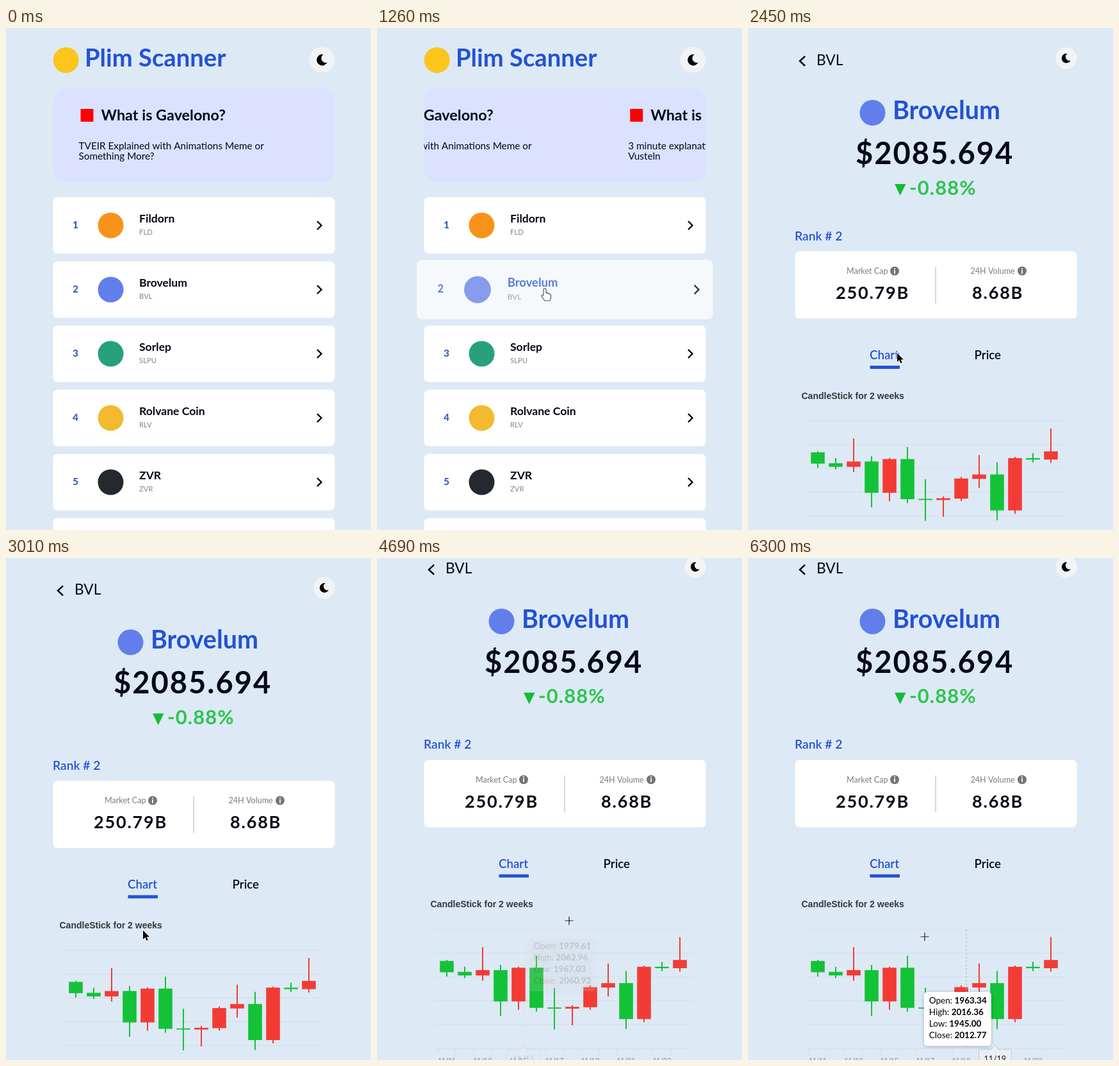
An HTML page with a canvas that plays this animation: 570 px wide and 782 px high, repeating every 6.37 s.

```html
<!DOCTYPE html>
<html lang="en">
<head>
<meta charset="utf-8">
<title>Plim Scanner</title>
<style>
html, body { margin: 0; width: 100%; height: 100%; overflow: hidden; background: #dde9f5; }
canvas { display: block; }
</style>
</head>
<body>
<canvas id="stage" width="570" height="782"></canvas>
<script>
const ctx = document.getElementById('stage').getContext('2d');
const LOOP = 6370, STEP = 70, BLUE = '#2352d4', INK = '#060818', BG = '#dde9f5';
const GREEN = '#14c237', RED = '#f33b36', SCROLL_END = 33.3;

const coins = [
  ['Fildorn', 'FLD', '#f7931a'], ['Brovelum', 'BVL', '#627eea'], ['Sorlep', 'SLPU', '#26a17b'],
  ['Rolvane Coin', 'RLV', '#f3ba2f'], ['ZVR', 'ZVR', '#23292f'], ['', '', '#fff']
];
const slides = [
  ['What is Gavelono?', 'TVEIR Explained with Animations Meme or', 'Something More?'],
  ['What is Brovelum?', '3 minute explanation with Tamelik', 'Vusteln']
];
// Each day opens where the day before closed.
const closes = [628, 645, 650, 642.3, 690.5, 638.5, 700.5, 701.7, 699.5, 668.8, 662.5, 718, 637, 638.7, 626.5];
const hints = [
  { at: 3500, day: 3, top: 595, values: '2054.16 2065.00 1933.00 1979.44' },
  { at: 4410, day: 4, top: 591, values: '1979.61 2062.96 1967.03 2060.92' },
  { at: 5180, day: 11, top: 676, values: '1936.10 2087.40 1933.80 2062.30' },
  { at: 6230, day: 8, top: 676, values: '1963.34 2016.36 1945.00 2012.77' }
];
const cursorPath = [
  [1470, 262, 407], [1680, 259, 405], [3010, 214, 580], [3500, 222, 490], [3640, 192, 663], [4340, 192, 663],
  [4690, 300, 565], [5040, 417, 560], [5320, 417, 690], [6090, 417, 690], [6300, 276, 590]
];

const HAND = new Path2D('M-1.6 0Q0-2 1.6 0V6Q3.8 5 4.6 7Q6.6 6 7 8Q9.3 7.5 9.3 10V13L7.5 17.5H0L-4.6 11Q-5 8.5-2.6 9.5L-1.6 10.5Z');
const ARROW = new Path2D('M0 0V14L3.3 11 5.5 16 7.8 15 5.6 10.2H10Z');
const PLUS = new Path2D('M-6.5 0H6.5M0-6.5V6.5');
const MOON = new Path2D('M2-8.3A8.7 8.7 0 1 0 8 4.2A7 7 0 0 1 2-8.3Z');

const clamp = v => Math.max(0, Math.min(1, v));
const mix = (a, b, p) => a + (b - a) * p;
const smooth = p => .5 - .5 * Math.cos(Math.PI * clamp(p));

function cursorAt(t) {
  const next = cursorPath.findIndex(k => k[0] > t);
  if (next < 1) return cursorPath.at(next).slice(1);
  const [t0, x0, y0] = cursorPath[next - 1], [t1, x1, y1] = cursorPath[next];
  const p = (t - t0) / (t1 - t0);
  return [mix(x0, x1, p), mix(y0, y1, p)];
}

function text(str, x, y, size, { color = INK, weight = 400, spacing = 0, align = 'left', font = 'Lato' } = {}) {
  ctx.font = `${weight} ${size}px ${font}, sans-serif`;
  ctx.letterSpacing = spacing + 'px';
  ctx.textAlign = align;
  ctx.fillStyle = color;
  ctx.fillText(str, x, y);
}
function box(x, y, w, h, r, color) {
  ctx.fillStyle = color;
  ctx.beginPath();
  ctx.roundRect(x, y, w, h, r);
  ctx.fill();
}
function disc(x, y, r, color) {
  box(x - r, y - r, 2 * r, 2 * r, r, color);
}
function line(points, color, width = 1) {
  ctx.beginPath();
  points.forEach(p => ctx.lineTo(...p));
  ctx.strokeStyle = color;
  ctx.lineWidth = width;
  ctx.stroke();
}
function placed(x, y, scale, draw) {
  ctx.save();
  ctx.translate(x, y);
  ctx.scale(scale, scale);
  draw();
  ctx.restore();
}
function themeButton(x, y, scale) {
  placed(x, y, scale, () => {
    disc(0, 0, 20, '#f2f3f4');
    ctx.fillStyle = '#000';
    ctx.fill(MOON);
  });
}

function carousel(shift) {
  ctx.save();
  ctx.beginPath();
  ctx.roundRect(73.5, 94, 440, 146, 20);
  ctx.fillStyle = '#dae2ff';
  ctx.fill();
  ctx.clip();
  slides.forEach(([title, first, second], i) => {
    const x = 113.5 + 440 * i - shift;
    box(x + 3, 126, 20, 20, 0, '#f00');
    text(title, x + 35, 144, 23.4, { weight: 700 });
    text(first, x, 189, 15.3);
    text(second, x, 205, 15.3);
  });
  ctx.restore();
}

function coinRow([name, ticker, color], i, hover) {
  ctx.globalAlpha = 1 - .25 * hover;
  placed(293.5, 307.5 + 100 * i, 1 + .05 * hover, () => {
    box(-220, -44, 440, 88, 7, '#fff');
    text(i + 1, -185, 4.5, 15.5, { color: '#2450c4', weight: 700, align: 'center' });
    disc(-130, 0, 20, color);
    text(name, -85.5, -4.5, 17.6, { color: hover ? BLUE : INK, weight: 700 });
    text(ticker, -85.5, 14.5, 11.3, { color: '#87878c' });
    line([[192.5, -6.5], [199, 0], [192.5, 6.5]], '#000', 2.4);
  });
  ctx.globalAlpha = 1;
}

function home(t) {
  disc(93.7, 50, 20, '#fbc51d');
  text('Plim Scanner', 123, 60, 38.2, { color: BLUE, weight: 700 });
  themeButton(493.5, 49.5, 1);
  carousel(440 * smooth((t - 1053) / 500));
  const hover = smooth((t - 840) / 280);
  coins.forEach((coin, i) => coinRow(coin, i, i === 1 ? hover : 0));
}

function stat(label, x, iconX, value, valueX) {
  text(label, x, 383, 12.6, { color: '#7b7b83' });
  disc(iconX, 378.5, 7, '#74747c');
  text('i', iconX, 382.5, 11, { color: '#fff', weight: 900, align: 'center' });
  text(value, valueX, 422, 27, { weight: 700, spacing: 1.8 });
}

function summary() {
  line([[89, 44], [81, 51.5], [89, 59]], '#000', 2.5);
  text('BVL', 107, 57.5, 22.7);
  themeButton(497, 47, .85);
  disc(194.5, 132, 20, '#627eea');
  text('Brovelum', 226, 142, 39.4, { color: BLUE, weight: 700 });
  text('$2085.694', 168, 212, 47, { weight: 700, spacing: 2 });
  ctx.fillStyle = '#16bb36';
  ctx.fill(new Path2D('M229 243H246.5L237.7 261Z'));
  text('-0.88%', 252, 259.5, 31, { color: '#2cc54c', weight: 700, spacing: 1.1 });
  text('Rank # 2', 73, 330.5, 19.2, { color: BLUE, weight: 600 });
  box(73.5, 347.8, 440, 105, 7, '#fff');
  line([[293, 372], [293, 429]], '#c9c9cc', 1.5);
  stat('Market Cap', 154, 229, '250.79B', 137);
  stat('24H Volume', 347.5, 428, '8.68B', 350);
  text('Chart', 190, 516, 18.7, { color: BLUE, weight: 600 });
  text('Price', 353.5, 516, 18.7, { weight: 600 });
  box(190.5, 526, 46.5, 5, 0, BLUE);
  text('CandleStick for 2 weeks', 83.5, 577.5, 14, { color: '#33383c', weight: 700, font: 'Liberation Sans' });
}

const dayX = day => 109 + 28 * day;
const wave = (day, peak, period) => Math.cos(Math.PI * (day - peak) / period) ** 2;
const wickUp = day => 2 + 34 * wave(day, 2, 3.67) ** 2;
const wickDown = day => 4 + 33 * Math.exp(-(((day - 6) / 4) ** 2)) * wave(day, 6.4, 3.4);

function candle(day, base, grown, [mx, my]) {
  const x = dayX(day), open = closes[day], close = closes[day + 1], up = close < open;
  const top = Math.min(open, close), bottom = Math.max(open, close);
  const hot = Math.abs(mx - x) < 11 && my > top && my < bottom;
  const color = hot ? (up ? '#ff7f78' : '#5ff279') : up ? RED : GREEN;
  const at = y => mix(base, y, grown);
  line([[x, at(top - wickUp(day))], [x, at(bottom + wickDown(day))]], color, 2);
  box(x - 10.8, at(top) - .3, 21.6, at(bottom) - at(top) + .6, 0, color);
}

function chart(t, mouse) {
  const base = 763.7, grown = smooth((t - 1700) / 600);
  for (let i = 0; i < 6; i++) line([[90, base - 37 * i], [493, base - 37 * i]], '#d3dee8');
  for (let day = 0; day < closes.length - 1; day++) {
    const x = dayX(day);
    if (grown) candle(day, base, grown, mouse);
    line([[x - 14, base], [x - 14, base + 6]], '#cfd9e3');
    if (day % 2 === 0) text('11/' + (11 + day), x, 788, 12, { color: '#8492ad', align: 'center', font: 'Liberation Sans' });
  }
  hint(t);
}

function hint(t) {
  const index = hints.findLastIndex(h => t >= h.at);
  if (index < 0) return;
  const now = hints[index], old = hints[index - 1] || now;
  const slide = clamp((t - now.at) / 150);
  const cross = h => dayX(h.day) + 8;
  const left = h => cross(h) + (h.day > 6 ? -111 : 7.5);
  const x = mix(left(old), left(now), slide), y = mix(old.top, now.top, slide);
  const labelX = mix(cross(old), cross(now), slide);
  const firstVisit = Math.min(clamp((t - 3500) / 140), clamp((4711 - t) / 140));

  ctx.globalAlpha = Math.max(firstVisit, clamp((t - 5180) / 140));
  ctx.setLineDash([3, 3]);
  line([[cross(now), 579], [cross(now), 763]], '#aeb7c0');
  ctx.setLineDash([]);

  ctx.save();
  ctx.shadowColor = '#0004';
  ctx.shadowBlur = 5;
  ctx.shadowOffsetY = 1;
  box(x, y, 105, 84, 5, '#fff');
  ctx.restore();
  const values = now.values.split(' ');
  ['Open: ', 'High: ', 'Low: ', 'Close: '].forEach((name, i) => {
    const row = y + 17.5 + 18 * i;
    text(name, x + 8, row, 13.5, { color: '#000' });
    text(values[i], x + 8 + ctx.measureText(name).width, row, 13.5, { color: '#000', weight: 700 });
  });

  const tag = [[-25, 766], [-6, 766], [0, 759], [6, 766], [25, 766], [25, 792], [-25, 792], [-25, 766]];
  line(tag.map(([dx, ty]) => [labelX + dx, ty]), '#98a8b3');
  ctx.fillStyle = '#eceff1';
  ctx.fill();
  text('11/' + (11 + now.day), labelX, 785, 12.5, { color: '#222', align: 'center' });
  ctx.globalAlpha = 1;
}

function pointer(t, [x, y]) {
  if (t < 770) return;
  const plus = t >= 3570, arrow = t >= 1470;
  const shape = plus ? PLUS : arrow ? ARROW : HAND;
  placed(x, y, 1, () => {
    ctx.lineWidth = plus ? 3 : 1.6;
    ctx.strokeStyle = plus ? '#fff9' : arrow ? '#fff' : '#111';
    ctx.stroke(shape);
    if (plus) {
      ctx.lineWidth = 1.2;
      ctx.strokeStyle = '#111';
      ctx.stroke(shape);
    } else {
      ctx.fillStyle = arrow ? '#000' : '#fff';
      ctx.fill(shape);
    }
  });
}

function render(now) {
  const t = Math.floor(now % LOOP / STEP) * STEP;
  const mouse = cursorAt(t);
  ctx.fillStyle = BG;
  ctx.fillRect(0, 0, 570, 782);
  if (t < 1470) home(t);
  else {
    const scroll = SCROLL_END * smooth((t - 2960) / 540);
    placed(0, -scroll, 1, summary);
    placed(0, SCROLL_END - scroll, 1, () => chart(t, mouse));
  }
  pointer(t, mouse);
  requestAnimationFrame(render);
}
requestAnimationFrame(render);
</script>
</body>
</html>
```
